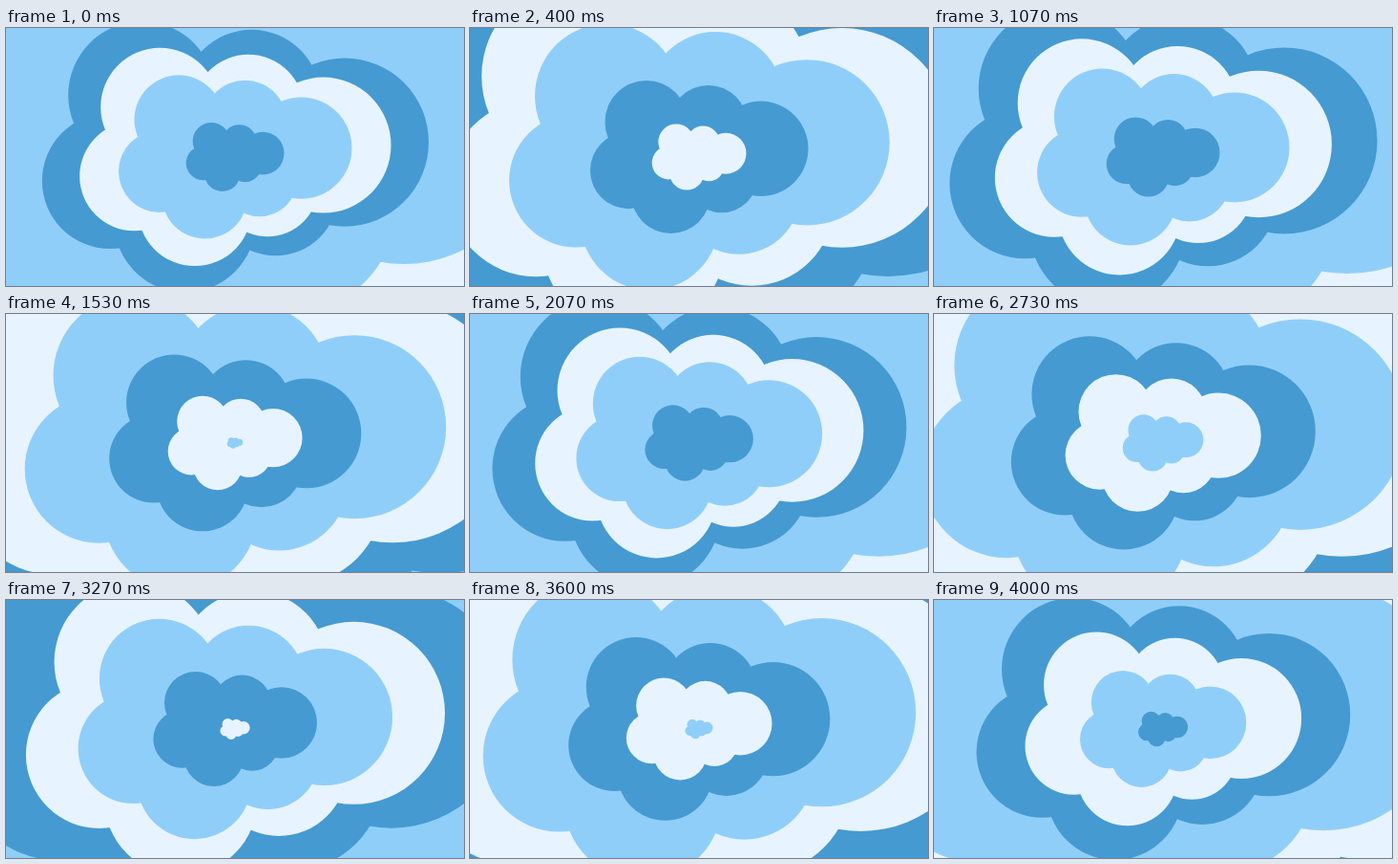
An HTML page with a canvas for the animation above (4070 ms loop, 480 px wide and 270 px high).

```html
<!DOCTYPE html>
<html>
<head>
<meta charset="utf-8">
<style>
  html, body { margin: 0; width: 100%; height: 100%; overflow: hidden; background: #e7f4ff; }
  canvas { display: block; }
</style>
</head>
<body>
<canvas id="stage" width="480" height="270"></canvas>
<script>
const ctx = document.getElementById('stage').getContext('2d');
const LOOP = 4070, STEPS = 61, BEAT = LOOP / 4;
const COLORS = ['#90cefa', '#459ad1', '#e7f4ff'];

// Outlines present when a beat starts: half-width and speed
const RINGS = [[313, 0.58], [203, 0.44], [163.5, 0.27], [122.5, 0.2], [51.5, 0.161]];
const NEW_RINGS = 3, FIRST_BIRTH = 134, NEW_SPEED = 0.19;

// Faster rings slow down more strongly
const grow = (size, speed, age) => size + speed * age - 0.0022 * speed ** 3 * age * age;

function lobe(size, x, y, r) {
  const cx = 240 + x * size, cy = 135 + y * size;
  ctx.moveTo(cx + r * size, cy);
  ctx.arc(cx, cy, r * size, 0, Math.PI * 2);
}

function cloud(color, size) {
  ctx.fillStyle = color;
  ctx.beginPath();
  lobe(size, 0.566, -0.076, 0.434);
  lobe(size, 0.086, -0.300, 0.356);
  lobe(size, -0.481, -0.319, 0.380);
  lobe(size, -0.646, 0.123, 0.350);
  lobe(size, -0.258, 0.333, 0.365);
  lobe(size, 0.209, 0.184, 0.325);
  lobe(size, -0.05, 0, 0.35); // fills the middle
  ctx.fill();
}

function draw(time) {
  const step = Math.floor(time / LOOP * STEPS + 0.1) % STEPS;
  const phase = (step * LOOP / STEPS) % BEAT;
  ctx.fillStyle = COLORS[2];
  ctx.fillRect(0, 0, 480, 270);

  const sizes = RINGS.map(([size, speed]) => grow(size, speed, phase));
  for (let i = 0; i < NEW_RINGS; i++) {
    const age = phase - FIRST_BIRTH - i * BEAT / NEW_RINGS;
    if (age > 0) sizes.push(grow(0, NEW_SPEED, age));
  }
  sizes.forEach((size, i) => cloud(COLORS[i % 3], size));
}

const start = performance.now();
function tick() {
  draw((performance.now() - start) % LOOP);
  requestAnimationFrame(tick);
}
tick();
</script>
</body>
</html>
```
